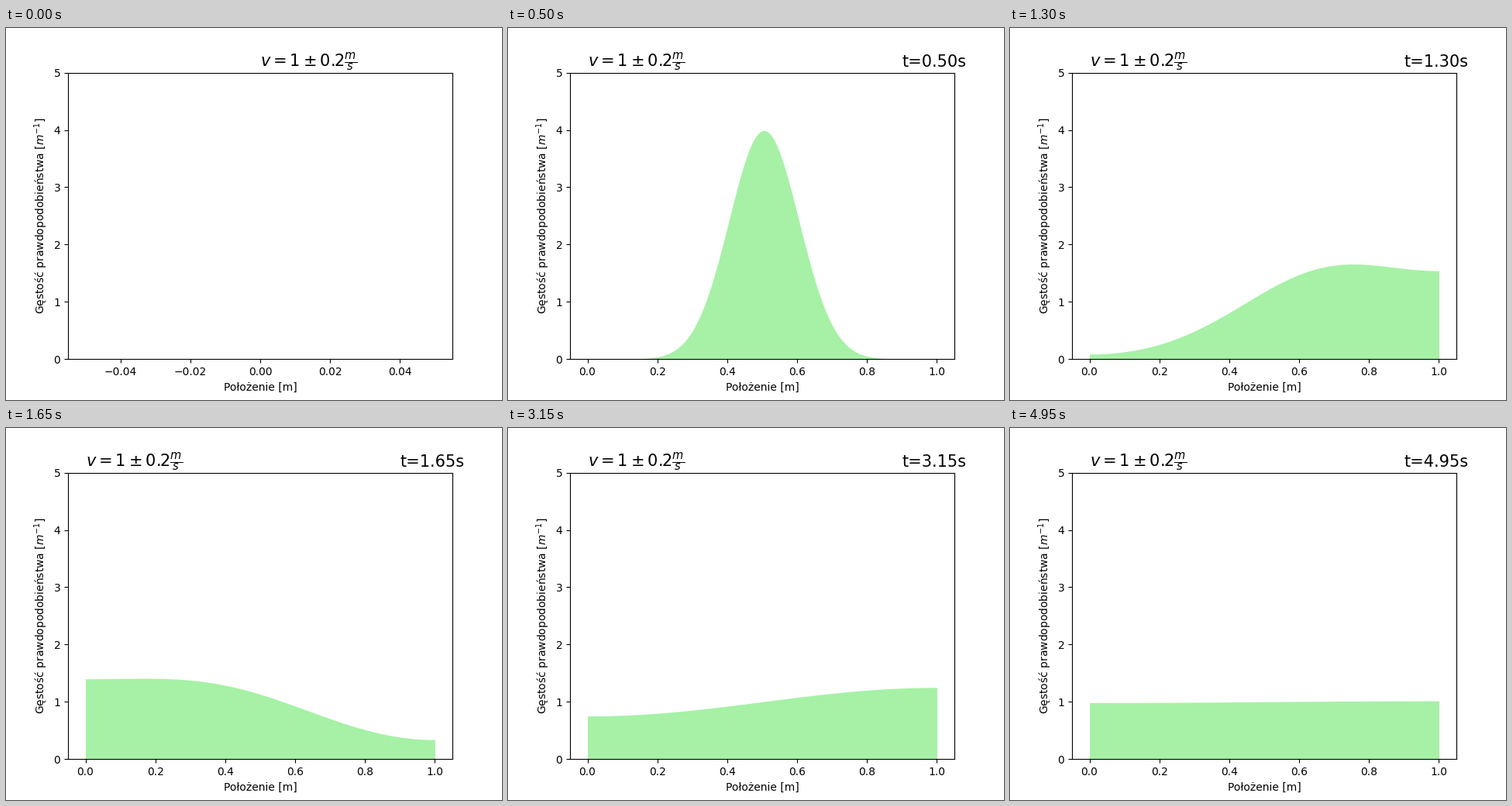
Animation of 640x480 px, one loop 5 s. Source, as a matplotlib script:

```python
import numpy as np
import matplotlib.pyplot as plt
from matplotlib.animation import FuncAnimation

FRAMES = 100
STEP = 0.05       # seconds per frame
START = 0.005     # initial position, m
SPEED = 1.0       # mean velocity, m/s
SPREAD = 0.2      # velocity uncertainty, m/s

x = np.linspace(0, 1, 1001)
fig, ax = plt.subplots(figsize=(6.4, 4.8), dpi=100)


def gauss(pos, mean, sigma):
    z = (pos - mean) / sigma
    return np.exp(-z * z / 2) / (sigma * np.sqrt(2 * np.pi))


def density(t):
    """Spreading packet bouncing between walls at 0 and 1 (image method)."""
    mean, sigma = START + SPEED * t, SPREAD * t
    return sum(gauss(2 * k + x, mean, sigma) + gauss(2 * k - x, mean, sigma)
               for k in range(-3, 8))


def draw(i):
    t = i * STEP
    ax.clear()
    if i == 0:
        ax.set_xlim(-0.055, 0.055)
    else:
        ax.fill_between(x, density(t), color="lightgreen", alpha=0.8, linewidth=0)
        ax.set_xlim(-0.05, 1.05)
        ax.text(0.9, 5.1, f"t={t:.2f}s", fontsize=15)
    ax.set_ylim(0, 5)
    ax.text(0, 5.1, r"$v=1\pm0.2\frac{m}{s}$", fontsize=15)
    ax.set_xlabel("Położenie [m]")
    ax.set_ylabel("Gęstość prawdopodobieństwa [$m^{-1}$]")


anim = FuncAnimation(fig, draw, frames=FRAMES, interval=50, repeat=True)
plt.show()
```
